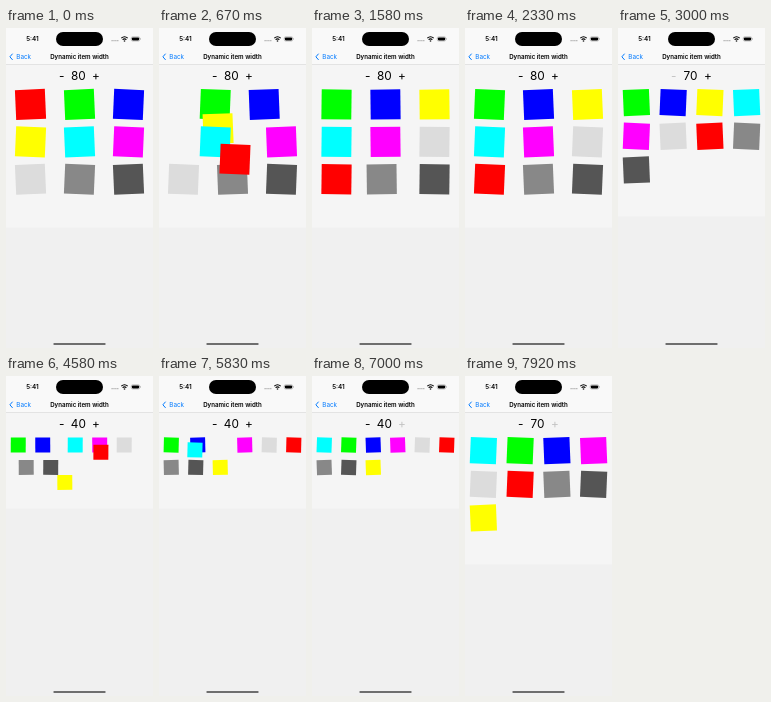
An HTML page for the animation above (8010 ms loop, 147 by 320 pixels).

```html
<!DOCTYPE html>
<html lang="en">
<head>
<meta charset="utf-8">
<title>Dynamic item width</title>
<style>
  html, body { margin: 0; width: 100%; height: 100%; overflow: hidden; background: #f0f0f0; }
  svg { display: block; width: 147px; height: 320px; }
  text { font-family: Inter, "Liberation Sans", sans-serif; }
</style>
</head>
<body>
<svg viewBox="0 0 147 320">
  <rect width="147" height="320" fill="#f0f0f0"/>
  <rect id="panel" y="36" width="147" fill="#f5f5f5"/>
  <rect width="147" height="36" fill="#f9f9f9"/>
  <rect y="36" width="147" height=".4" fill="#c8c8c8"/>

  <text x="20.2" y="13.3" font-size="6.3" font-weight="600">5:41</text>
  <rect x="50" y="4" width="47" height="14" rx="7"/>
  <path d="M105.5 12.6h7" stroke="#aaa" stroke-width="1.2" stroke-dasharray="1.2 .7"/>
  <g fill="none" stroke="#000" stroke-width="1.1">
    <path d="M115.3 10.2q3.2-2.8 6.4 0M116.6 11.7q1.9-1.6 3.8 0"/>
    <path d="M118.5 12.4v1.2" stroke-width="1.4"/>
  </g>
  <rect x="125.2" y="8.7" width="8.6" height="4.4" rx="1.4" fill="none" stroke="#999" stroke-width=".5"/>
  <rect x="125.9" y="9.4" width="7.2" height="3" rx=".8"/>
  <rect x="134.4" y="10.1" width=".5" height="1.6" fill="#999"/>

  <path d="M6.6 25.7L3.9 28.8L6.6 31.9" fill="none" stroke="#007aff" stroke-width="1"/>
  <text x="10.3" y="31" font-size="6.3" fill="#007aff">Back</text>
  <text x="73.5" y="31" font-size="6.15" font-weight="600" text-anchor="middle">Dynamic item width</text>

  <g font-size="11.8" text-anchor="middle">
    <text id="minus" x="55.7" y="51.5">-</text>
    <text id="width" x="72.4" y="51.5">80</text>
    <text id="plus" x="90" y="51.5">+</text>
  </g>
  <g id="tiles"></g>
  <rect x="47.3" y="315.2" width="52.4" height="1.6" rx=".8" fill="#444"/>
</svg>
<script>
const LOOP = 8010, SHIFT = 300, WIGGLE = 427, TAP = 320;
const SCALE = 147 / 393, TOP = 61.5;
const colors = ['#f00', '#0f0', '#00f', '#ff0', '#0ff', '#f0f', '#dcdcdc', '#888', '#555'];
const reversed = [2, 3, 5, 7]; // tiles that wiggle the other way

// A drag follows a cubic curve from the tile's old slot to its new one;
// each swap is [time, new index].
const drags = [
  { tile: 0, start: 230, end: 1500, bend: [[120, 125], [63, 204]], swaps: [[545, 4], [850, 7], [1340, 6]] },
  { tile: 3, start: 4200, end: 4950, bend: [[58, 115], [58, 115]], swaps: [[4402, 8]] },
  { tile: 4, start: 5620, end: 6350, bend: [[23, 77], [20, 77]], swaps: [[5770, 1], [6080, 0]] },
];

const taps = first => [0, 1, 2, 3].map(i => first + i * TAP);
const minusTaps = taps(2690), plusTaps = taps(LOOP - 3 * TAP);

let order = colors.map((_, i) => i);
const layouts = [{ time: -SHIFT, order }];
for (const drag of drags) {
  drag.from = order.indexOf(drag.tile);
  for (const [time, index] of drag.swaps) {
    order = order.filter(id => id !== drag.tile);
    order.splice(index, 0, drag.tile);
    layouts.push({ time, order, moved: drag.tile });
  }
  drag.to = order.indexOf(drag.tile);
}

const $ = id => document.getElementById(id);
const mix = (a, b, p) => a.map((v, i) => v + (b[i] - v) * p);
const ease = p => p < .5 ? 2 * p * p : 1 - 2 * (1 - p) ** 2;
const passed = (list, t) => list.filter(tap => t >= tap).length;
const tapOpacity = (list, t) => list.some(tap => t > tap - 130 && t < tap + 50) ? .2 : 1;

function curve(points, p) {
  while (points.length > 1) points = points.slice(1).map((point, i) => mix(points[i], point, p));
  return points[0];
}

function draw(t) {
  const points = 80 - 10 * passed(minusTaps, t) + 10 * passed(plusTaps, t);
  const size = points * SCALE, pitch = (points + 20) * SCALE;
  const columns = Math.floor(393 / (points + 20));
  const slot = i => [(i % columns + .5) * 147 / columns, TOP + size / 2 + Math.floor(i / columns) * pitch];

  const last = layouts.findLastIndex(layout => t >= layout.time);
  const { time, order, moved } = layouts[last];
  const before = layouts[Math.max(0, last - 1)].order;
  const progress = ease(Math.min(1, (t - time) / SHIFT));
  const drag = drags.find(({ start, end }) => t >= start && t < end);
  const angle = -2.5 * Math.cos(2 * Math.PI * t / WIGGLE);

  function place(id) {
    const target = slot(order.indexOf(id));
    if (id === drag?.tile) {
      return curve([slot(drag.from), ...drag.bend, slot(drag.to)], (t - drag.start) / (drag.end - drag.start));
    }
    return id === moved ? target : mix(slot(before.indexOf(id)), target, progress);
  }
  const tile = id => `<rect x="${-size / 2}" y="${-size / 2}" width="${size}" height="${size}" fill="${colors[id]}"
    transform="translate(${place(id)}) rotate(${reversed.includes(id) ? -angle : angle})"/>`;

  // The dragged tile is drawn last, on top of the others.
  const stack = order.filter(id => id !== drag?.tile);
  if (drag) stack.push(drag.tile);
  $('tiles').innerHTML = stack.map(tile).join('');

  const rows = Math.ceil(colors.length / columns);
  $('panel').setAttribute('height', TOP + (rows - 1) * pitch + size + 33.5 - 36);
  $('width').textContent = points;
  $('minus').setAttribute('opacity', tapOpacity(minusTaps, t));
  $('plus').setAttribute('opacity', tapOpacity(plusTaps, t));
}

const start = performance.now();
function frame() {
  draw((performance.now() - start) % LOOP);
  requestAnimationFrame(frame);
}
frame();
</script>
</body>
</html>
```
